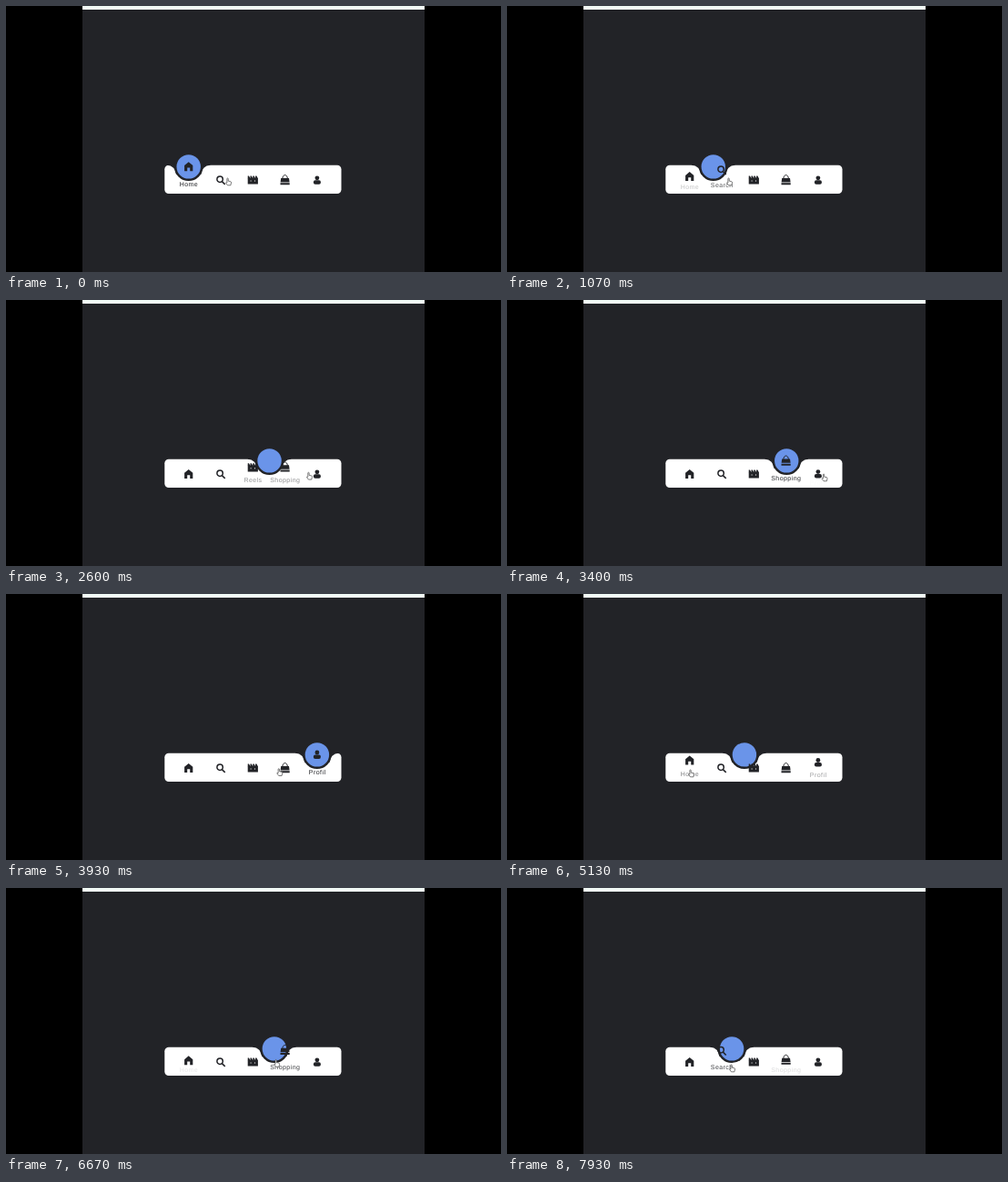
An HTML page that plays this animation: 544 px wide and 292 px high, repeating every 8000 ms.

```html
<!DOCTYPE html>
<html lang="en">
<head>
<meta charset="utf-8">
<title>Navigation bar</title>
<style>
  html, body { margin: 0; width: 100%; height: 100%; overflow: hidden; background: #000; }
  svg { display: block; width: 544px; height: 292px; }
  text {
    font: 7px "Liberation Sans", Arial, sans-serif; letter-spacing: .45px;
    text-anchor: middle; text-rendering: geometricPrecision;
  }
  .line { fill: none; stroke: #222327; }
</style>
</head>
<body>
<svg viewBox="0 0 544 292" fill="#222327">
  <rect x="84" width="376" height="292"/>
  <rect x="84" width="376" height="4" fill="#f3fcf8"/>
  <rect x="174.3" y="174.8" width="194.2" height="31.2" rx="4.5" fill="#fff"/>
  <g id="indicator">
    <path d="M-23.7 -3V-1.6a10 10 0 0 1 10 10H13.7a10 10 0 0 1 10 -10V-3Z"/>
    <circle r="15.7"/>
    <circle r="13.2" fill="#6a94e9"/>
  </g>
  <g id="items"></g>
  <path id="cursor" fill="#fff" stroke="#444" stroke-width=".7" stroke-linejoin="round"
    d="M-1.6 -3.6q.7 -.8 1.3 0v2.7l2.7 .6q.8 .3 .6 1.3l-.6 2.8h-3.4l-2 -2.6q0 -.9 1.4 -.2z"/>
</svg>
<script>
const LOOP = 8000, FADE = 500;
const slotX = i => 200.7 + 35.3 * i;

// Icons are centred on 0,0; holes show whatever lies behind.
const teeth = [0, 1, 2, 3].map(n => `M${2.8 * n - 5.6} -4.5h1.3l1.5 2.7h-2.8z`).join('');
const icons = {
  Home: '<path d="M0 -5L4.6 -1.2V5H1.5V1.2h-3V5H-4.6V-1.2Z"/>',
  Search: '<g class="line" stroke-width="1.5"><circle cx="-.9" cy="-.8" r="3.2"/><path d="M1.4 1.6L4.7 4.9"/></g>',
  Reels: `<path d="${teeth}"/><path fill-rule="evenodd" d="M-5.6 -2H5.6V4.6H-5.6ZM-2.7 .4h1v1h-1zm4.4 0h1v1h-1z"/>`,
  Shopping: '<path class="line" d="M-2.7 -1.5c0 -5.2 5.4 -5.2 5.4 0"/><path d="M-4.4 -2H4.4L5 2.4H-5ZM-5.1 3.2H5.1V5.2H-5.1Z"/>',
  Profil: '<circle cy="-2.2" r="2.4"/><rect x="-4" y=".3" width="8" height="4.4" rx="1.9"/>'
};

// [time, chosen item]
const clicks = [[850, 1], [1685, 2], [2450, 3], [3385, 4], [4965, 0], [6368, 3], [7659, 1]];

// Where the pointer rests: [arrives, leaves, x, y]
const rests = [
  [0, 1600, 244.5, 193], [2050, 2450, 304, 190], [2700, 3420, 349, 195],
  [4750, 5250, 202.5, 197], [6000, 6570, 302, 192], [7150, LOOP, 247.5, 198]
];

const $ = id => document.getElementById(id);
const mix = (a, b, k) => a + (b - a) * k;
const clamp = k => Math.min(1, Math.max(0, k));
const smooth = k => k * k * (3 - 2 * k);
const move = (el, x, y) => el.setAttribute('transform', `translate(${x} ${y})`);

$('items').innerHTML = Object.entries(icons)
  .map(([name, icon]) => `<g><g>${icon}</g><text>${name}</text></g>`).join('');
const items = [...$('items').children];

// CSS "ease": cubic-bezier(.25, .1, .25, 1), solved by bisection
function ease(x) {
  const curve = (a, b, s) => 3 * a * s * (1 - s) ** 2 + 3 * b * s * s * (1 - s) + s ** 3;
  let lo = 0, hi = 1;
  for (let n = 0; n < 24; n++) {
    const mid = (lo + hi) / 2;
    if (curve(.25, .25, mid) < x) lo = mid; else hi = mid;
  }
  return curve(.1, 1, lo);
}

function drawBar(t) {
  let from = 0, to = 0, start = -FADE;
  for (const [time, item] of clicks) {
    if (time <= t) [from, to, start] = [to, item, time];
  }
  const k = ease(clamp((t - start) / FADE));
  move($('indicator'), mix(slotX(from), slotX(to), k), 176.4);

  items.forEach((item, i) => {
    const [icon, label] = item.children;
    const active = i === to ? k : i === from ? 1 - k : 0;
    move(icon, slotX(i), mix(191, 176.2, active));
    move(label, slotX(i) + .2, mix(202.6, 198.1, active));
    label.setAttribute('opacity', active);
  });
}

function drawCursor(t) {
  const n = rests.findLastIndex(r => r[0] <= t);
  const [, leaves, x, y] = rests[n];
  const [arrives, , nextX, nextY] = rests[n + 1] || rests[n];
  const k = t > leaves ? smooth((t - leaves) / (arrives - leaves)) : 0;
  move($('cursor'), mix(x, nextX, k), mix(y, nextY, k));
}

const begin = performance.now();
function tick() {
  const t = (performance.now() - begin) % LOOP;
  drawBar(t);
  drawCursor(t);
  requestAnimationFrame(tick);
}
tick();
</script>
</body>
</html>
```
